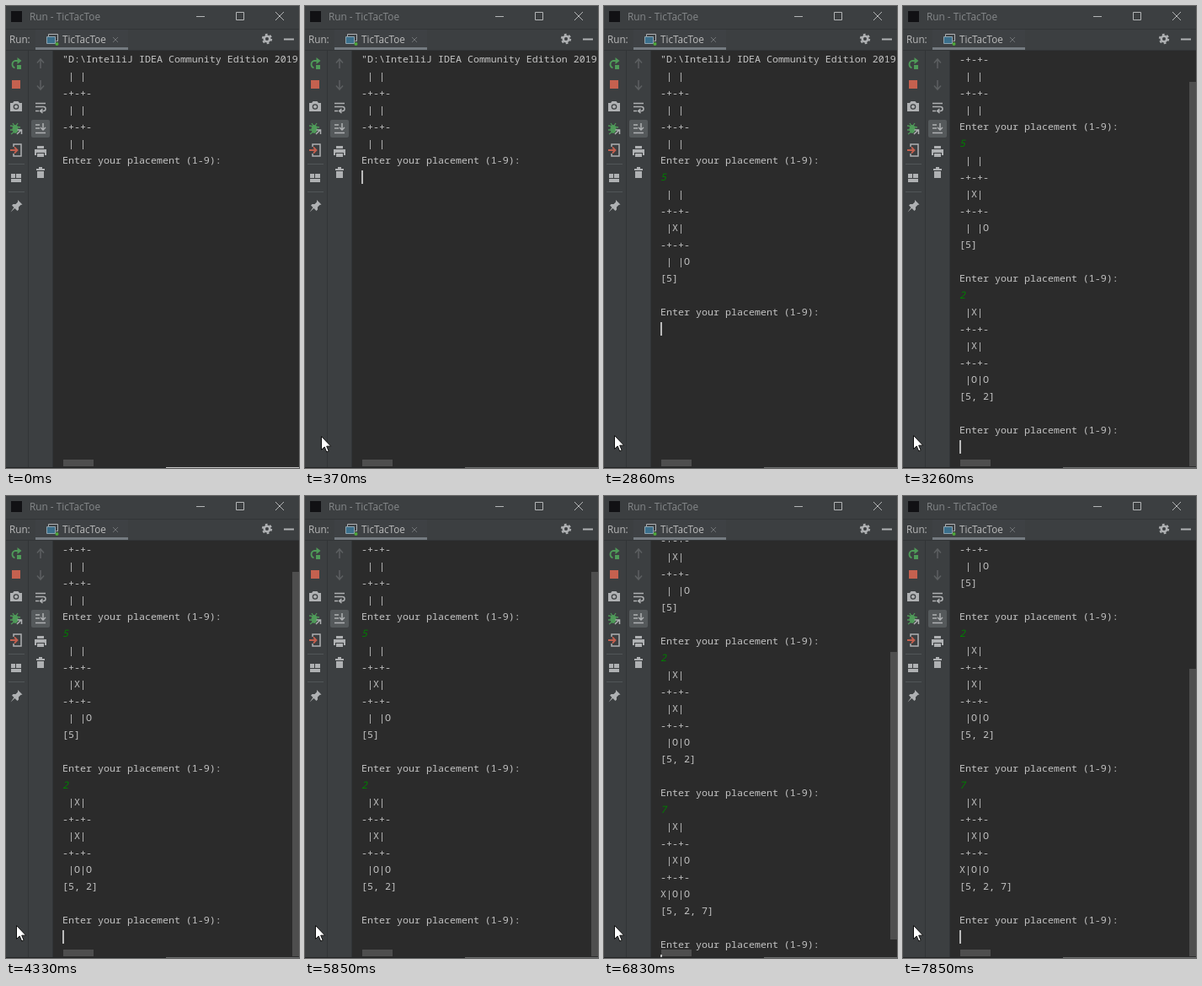
An HTML page that plays this animation: 348x548 px, repeating every 8 s.

```html
<!DOCTYPE html>
<html lang="en">
<head>
<meta charset="utf-8">
<title>TicTacToe</title>
<style>
html, body { margin: 0; width: 100%; height: 100%; overflow: hidden; background: #2b2b2b; }
#stage { position: relative; width: 348px; height: 548px; overflow: hidden; background: #3c3f41; }
svg { position: absolute; left: 0; top: 0; }
svg text { font: 11.7px "Open Sans", "Noto Sans", sans-serif; fill: #bbb; stroke: none; }
#console { position: absolute; left: 56px; top: 53px; width: 292px; height: 494px; overflow: hidden; background: #2b2b2b; }
#doc { position: absolute; left: 0; top: 0; }
pre { margin: 0 0 0 11px; font: 11.667px/20px "Noto Sans Mono", "DejaVu Sans Mono", monospace; color: #c4c4c4; }
pre i { color: #007f00; }
#caret { position: absolute; width: 2px; height: 16px; background: #bbb; }
.bar { position: absolute; background: rgba(255, 255, 255, .165); }
#vbar { right: 0; width: 8px; }
#hbar { left: 12px; top: 485px; width: 36px; height: 8px; }
</style>
</head>
<body>
<div id="stage">
  <div id="console">
    <div id="doc"><pre id="out"></pre><div id="caret"></div></div>
    <div id="vbar" class="bar"></div>
    <div id="hbar" class="bar"></div>
  </div>
  <svg width="348" height="548" fill="none" stroke="#afb1b3" stroke-width="1.5">
    <!-- title bar -->
    <rect x="6" y="6" width="13" height="13" fill="#111114" stroke="none"/>
    <text x="28" y="17" style="font-size:11.8px;fill:#85888a">Run - TicTacToe</text>
    <path d="M226 12.5h10M273.5 7.5h9v9h-9zM320 7l10 10m0-10l-10 10" stroke="#b4b6b7" stroke-width="1"/>
    <!-- tab row -->
    <path d="M0 27.5h348M0 52.5h348M26.5 53v494M55.5 53v494" stroke="#323537" stroke-width="1"/>
    <rect x="35" y="28" width="110" height="21" fill="#3e4144" stroke="none"/>
    <rect x="35" y="49" width="110" height="3" fill="#747a80" stroke="none"/>
    <text x="4" y="44">Run:</text>
    <text x="67" y="44">TicTacToe</text>
    <path d="M50.5 36v-2.500h11v8h-2" stroke-width="1"/>
    <path d="M48.500 36.500h10v8h-10z" fill="#3a6f8c" stroke="#8fa3ae" stroke-width="1"/>
    <circle cx="60.500" cy="45" r="2" fill="#4fa83a" stroke="none"/>
    <path d="M127 37l6 6m0-6l-6 6" stroke="#6e7173" stroke-width="1"/>
    <circle cx="310" cy="39" r="3.3" stroke-width="2.6"/>
    <circle cx="310" cy="39" r="5.2" stroke-width="2" stroke-dasharray="2.72"/>
    <path d="M330 39.5h12" stroke-width="2"/>
    <!-- left toolbar -->
    <path d="M10.500 73.500a4.500 4.500 0 0 1 0-8.500h4" stroke="#4f9a59" stroke-width="1.800"/>
    <path d="M13.500 61l5 4l-5 4zM13 70h5v5h-5z" fill="#4f9a59" stroke="none"/>
    <path d="M7 88h10v10h-10z" fill="#c4614f" stroke="none"/>
    <path d="M5 115h3l1.500-2h5l1.500 2h3v10h-14z" fill="#afb1b3" stroke="none"/>
    <circle cx="12" cy="119.500" r="2.700" fill="#afb1b3" stroke="#3c3f41" stroke-width="1.200"/>
    <ellipse cx="11" cy="146" rx="3.500" ry="5" fill="#4f9a59" stroke="none"/>
    <path d="M5 142l12 2M5 147h9M6 152l4-3M8 139l2 3m4-3l-2 3" stroke="#4f9a59" stroke-width="1.300"/>
    <path d="M13 152l5-5m-4.500 0h5v5" stroke="#afb1b3"/>
    <path d="M9 167v-3h9v14h-9v-3"/>
    <path d="M5 171h8m-3-3.500l3.500 3.500l-3.500 3.500" stroke="#c4614f" stroke-width="1.800"/>
    <path d="M3 187.500h19M3 220.500h19" stroke="#515658" stroke-width="1"/>
    <path d="M6 199h5v5h-5zM12 199h6v5h-6zM6 205h12v4h-12z" fill="#afb1b3" stroke="none"/>
    <path d="M14 230l5.500 5.500l-2 .500l-2.500 2.500v3l-1.500 1.500l-3-3l-5 4.500l4-5.500l-2.500-2.500l1.500-1.500h3l2.500-2.500z" fill="#afb1b3" stroke="none"/>
    <!-- console toolbar -->
    <path d="M41 74v-11m-4 4.500l4-4.500l4 4.500M41 88v11m-4-4.500l4 4.500l4-4.500" stroke="#5c5f61"/>
    <path d="M35 115.500h12M35 119.500h9.500a2.500 2.500 0 0 1 0 5h-3M35 124.500h4M43.500 122l-3 2.500l3 2.500"/>
    <rect x="30" y="135" width="22" height="21" rx="2" fill="#55595b" stroke="none"/>
    <path d="M35 141h5M35 145h5M35 150.500h12M44 139v8m-3-3l3 3l3-3"/>
    <path d="M37 166h8v3h-8zM34 170h14v7h-2v-3h-10v3h-2zM37 175h8v4h-8z" fill="#afb1b3" stroke="none"/>
    <path d="M36 193h10v2h-10zM39 191h4v2h-4zM37 196h8v8h-8z" fill="#afb1b3" stroke="none"/>
    <!-- bottom edge -->
    <path d="M0 547.5h190" stroke="#222425" stroke-width="1"/>
    <path id="edge" d="M190 547.5h158" stroke-width="1"/>
    <path id="mouse" d="M.5 .5v16l3.700-3.500l2.500 6l2.500-1l-2.500-5.800h5z" fill="#fff" stroke="#111" stroke-width="1"/>
  </svg>
</div>
<script>
const $ = id => document.getElementById(id);
const LOOP = 8000, VIEW = 493, ROW = 20;

const board = (a, b, c) => [a, '-+-+-', b, '-+-+-', c];
const prompt = 'Enter your placement (1-9):';
const rows = [
  '"D:\\IntelliJ IDEA Community Edition 2019.1',
  ...board(' | |', ' | |', ' | |'), prompt,
  '5', ...board(' | |', ' |X|', ' | |O'), '[5]', '', prompt,
  '2', ...board(' |X|', ' |X|', ' |O|O'), '[5, 2]', '', prompt,
  '7', ...board(' |X|', ' |X|O', 'X|O|O'), '[5, 2, 7]', '', prompt
].map(r => r.replace(/^\d$/, '<i>$&</i>'));

// time, caret row, caret column
const states = [
  [0, 7, 0], [1430, 7, 1], [1580, 8, 0], [1780, 16, 0], [3100, 16, 1],
  [3260, 25, 0], [6370, 25, 1], [6580, 26, 0], [6710, 34, 0]
];
const blinks = [360, 860, 1350, 2370, 2860, 3850, 4330, 4840, 5330, 5850, 6340, 7340, 7850];
const glide = [40, 65, 130, 191, 220];

function scrollAt(t) {
  if (t < 3260) return 0;
  const step = Math.floor((t - 6740) / 30);
  return glide[Math.max(0, Math.min(4, step))];
}

let shown = -1;
function draw(t) {
  const [, row, col] = states.findLast(s => s[0] <= t);
  const count = row + col;
  if (count !== shown) $('out').innerHTML = rows.slice(0, shown = count).join('\n');

  const scroll = scrollAt(t);
  const max = t < 3260 ? 0 : t < 6710 ? 40 : 220;
  const scale = VIEW / (VIEW + max);
  $('doc').style.top = -scroll + 'px';
  $('vbar').style.top = Math.round(scroll * scale) + 'px';
  $('vbar').style.height = max ? Math.round(VIEW * scale) + 'px' : 0;

  const caret = $('caret').style;
  caret.left = 11 + 6 * col + 'px';
  caret.top = row * ROW + 2 + 'px';
  caret.visibility = blinks.filter(b => b <= t).length % 2 ? 'visible' : 'hidden';

  // pointer slides in from the bottom edge
  const u = Math.min(1, (Math.floor((t - 50) / 33) + 1) / 12);
  const left = (1 - u) ** 2;
  $('mouse').setAttribute('transform', `translate(${Math.round(12 + 240 * left)} ${Math.round(509 + 40 * left)})`);
  $('mouse').style.visibility = t < 50 ? 'hidden' : 'visible';
  $('edge').style.stroke = t < 360 ? '#c4c4c4' : '#6a6c6d';
}

const start = performance.now();
function tick() {
  draw((performance.now() - start) % LOOP);
  requestAnimationFrame(tick);
}
tick();
</script>
</body>
</html>
```
